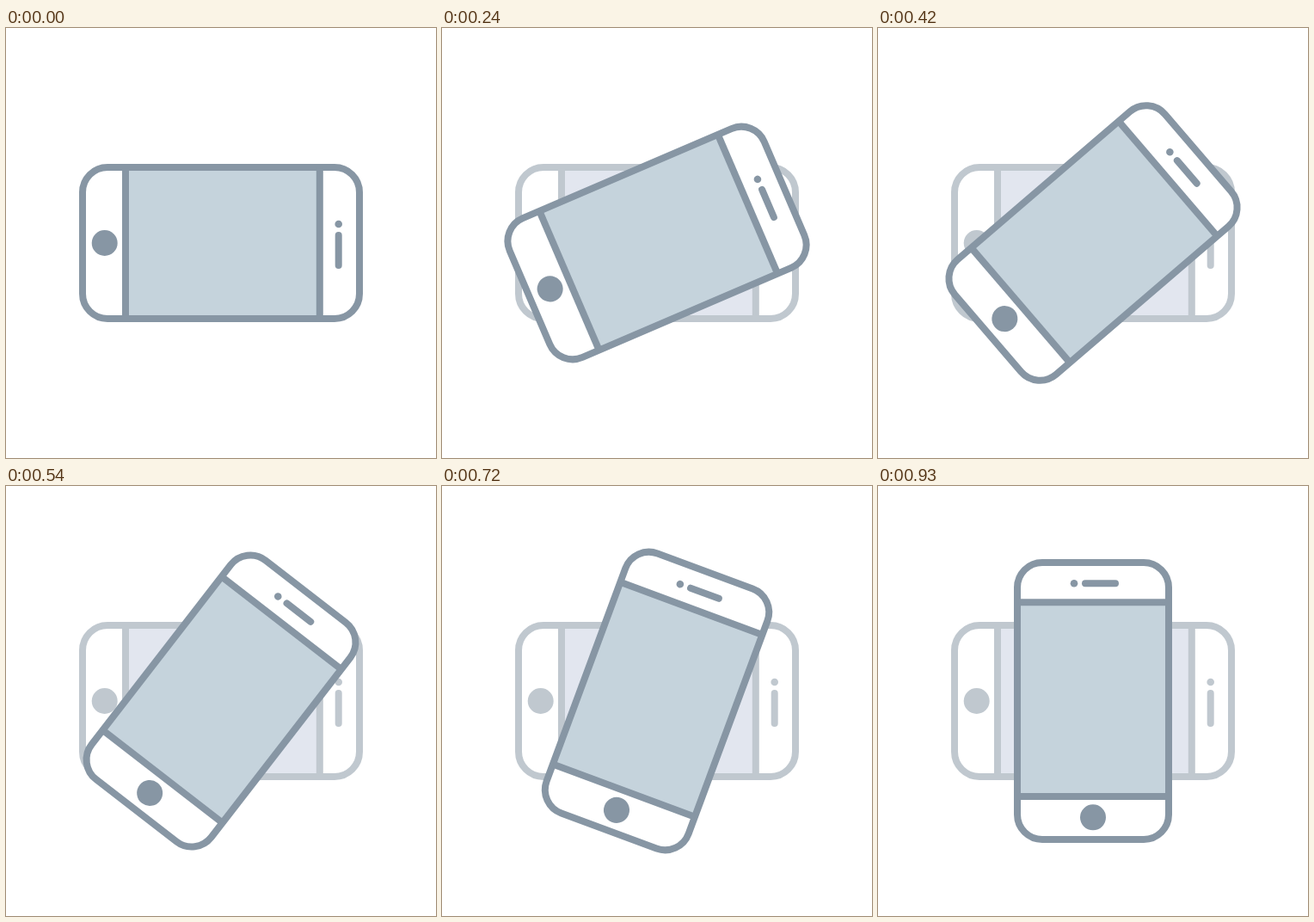
These frames come from a looping animation (500x500 px, 1.8 s). An HTML page with a canvas:

```html
<!DOCTYPE html>
<html lang="en">
<head>
<meta charset="utf-8">
<title>Rotate phone</title>
<style>
  html, body { margin: 0; width: 100%; height: 100%; overflow: hidden; background: #fff; }
  canvas { display: block; width: 500px; height: 500px; }
</style>
</head>
<body>
<canvas id="stage" width="500" height="500"></canvas>
<script>
const ctx = document.getElementById('stage').getContext('2d');
const LOOP = 1800;   // ms
const STEP = 30;     // ms per pose
const STEPS = 31;    // poses in a quarter turn
const SOLID = { line: '#8796a4', screen: '#c5d3dc' };
const GHOST = { line: '#c0c8cf', screen: '#e2e6ef' };

function line(x1, y1, x2, y2, cap) {
  ctx.lineCap = cap;
  ctx.beginPath();
  ctx.moveTo(x1, y1);
  ctx.lineTo(x2, y2);
  ctx.stroke();
}

function disc(x, y, r) {
  ctx.beginPath();
  ctx.arc(x, y, r, 0, Math.PI * 2);
  ctx.fill();
}

// A landscape phone centred on the stage, turned by the given angle
function phone(colors, angle) {
  ctx.save();
  ctx.translate(250, 250);
  ctx.rotate(angle);
  ctx.lineWidth = 8;
  ctx.strokeStyle = colors.line;

  ctx.beginPath();
  ctx.roundRect(-161, -88, 322, 176, 29);
  ctx.fillStyle = '#fff';
  ctx.fill();
  ctx.fillStyle = colors.screen;
  ctx.fillRect(-111, -88, 226, 176);
  ctx.stroke();

  line(-111, -88, -111, 88, 'butt');
  line(114.8, -88, 114.8, 88, 'butt');
  line(136.7, -9, 136.7, 26, 'round');

  ctx.fillStyle = colors.line;
  disc(-135.3, 0, 15);
  disc(136.7, -22, 4.3);
  ctx.restore();
}

function draw(now) {
  const step = Math.min(STEPS, Math.floor((now % LOOP) / STEP));
  ctx.fillStyle = '#fff';
  ctx.fillRect(0, 0, 500, 500);
  if (step > 0) phone(GHOST, 0);
  phone(SOLID, -Math.PI / 2 * step / STEPS);
}

const start = performance.now();
function tick() {
  draw(performance.now() - start);
  requestAnimationFrame(tick);
}
tick();
</script>
</body>
</html>
```
